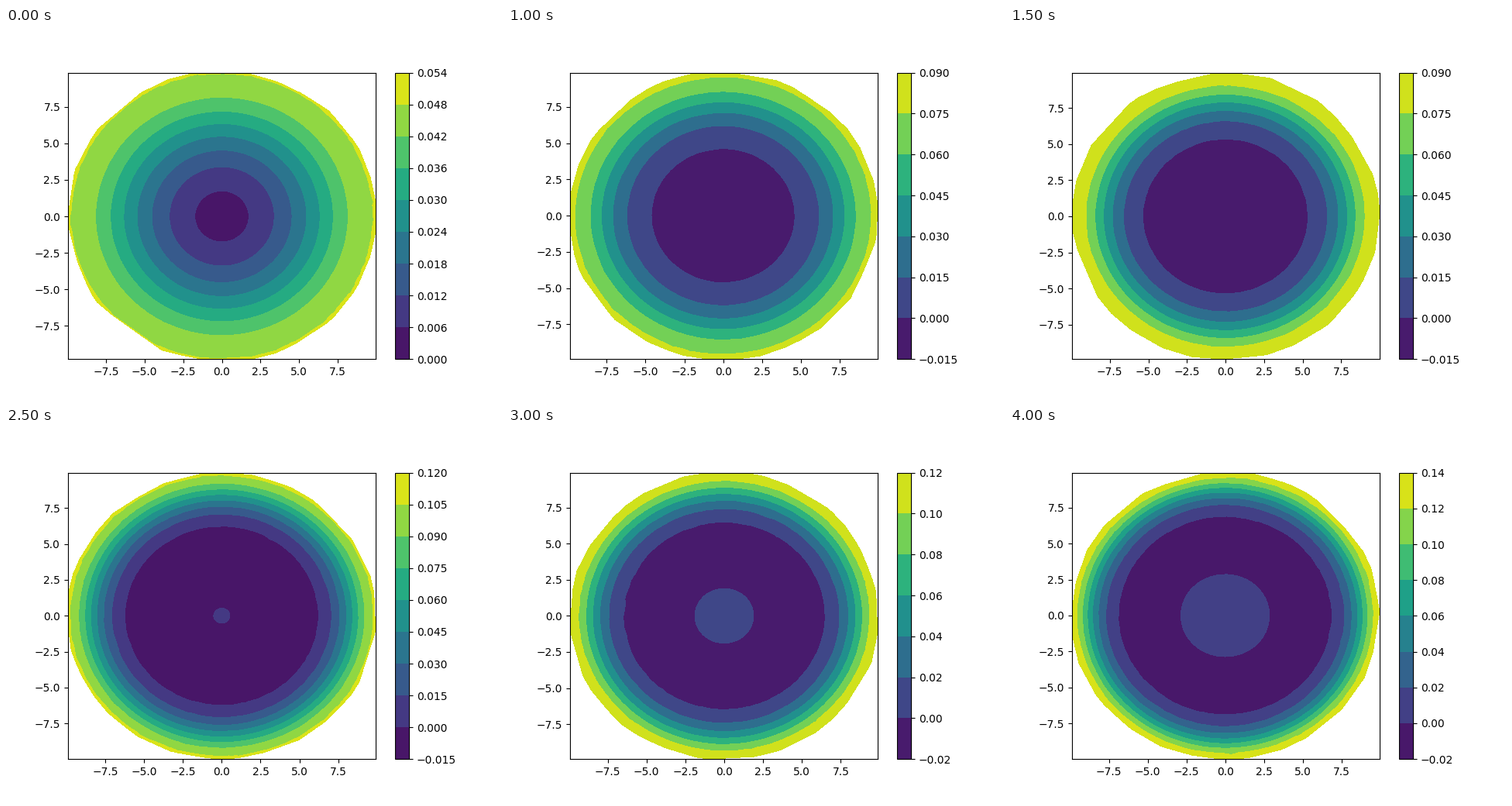
Recreate the animation shown at these times as a matplotlib script. Size 640 px wide and 480 px high, loop 4500 ms.

```python
import numpy as np
import matplotlib.pyplot as plt
from matplotlib.animation import FuncAnimation

RADIUS = 10
N_POINTS = 5000
N_STEPS = 9

# Field values at a few radii for four key steps; smooth curves join them.
KNOTS = np.array([0, 4, 5.5, 7, 8, 9, 10])
KEY_STEPS = np.array([0, 1, 4, 8])
KEY_VALUES = np.array([
    [.0037, .0150, .0241, .0346, .0411, .0460, .0482],
    [-.01025, .0012, .0142, .0331, .0475, .0597, .0670],
    [-.0025, -.0065, -.0031, .0175, .0456, .0788, .0990],
    [.0050, -.0037, -.0077, .0017, .0312, .0868, .1350],
])


def scatter(seed):
    """Random points in the disc, denser towards the middle."""
    rng = np.random.default_rng(seed)
    r = rng.uniform(0, RADIUS, N_POINTS)
    a = rng.uniform(0, 2 * np.pi, N_POINTS)
    return r, a


def field(r, step):
    """Polynomial in r squared whose knot values drift with sqrt(step)."""
    drift = np.polyfit(np.sqrt(KEY_STEPS), KEY_VALUES, len(KEY_STEPS) - 1)
    values = np.polyval(drift, np.sqrt(step))
    shape = np.polyfit((KNOTS / RADIUS) ** 2, values, len(KNOTS) - 1)
    return np.polyval(shape, (r / RADIUS) ** 2)


def draw(step):
    r, a = scatter(step + 1)
    x, y = r * np.cos(a), r * np.sin(a)

    fig.clf()
    ax = fig.add_subplot()
    filled = ax.tricontourf(x, y, field(r, step))
    ax.set_xlim(x.min(), x.max())
    ax.set_ylim(y.min(), y.max())
    fig.colorbar(filled, ax=ax)
    return []


fig = plt.figure(figsize=(6.4, 4.8), dpi=100)
anim = FuncAnimation(fig, draw, frames=N_STEPS, init_func=lambda: [],
                     interval=500, repeat=True, repeat_delay=0)
plt.show()
```
